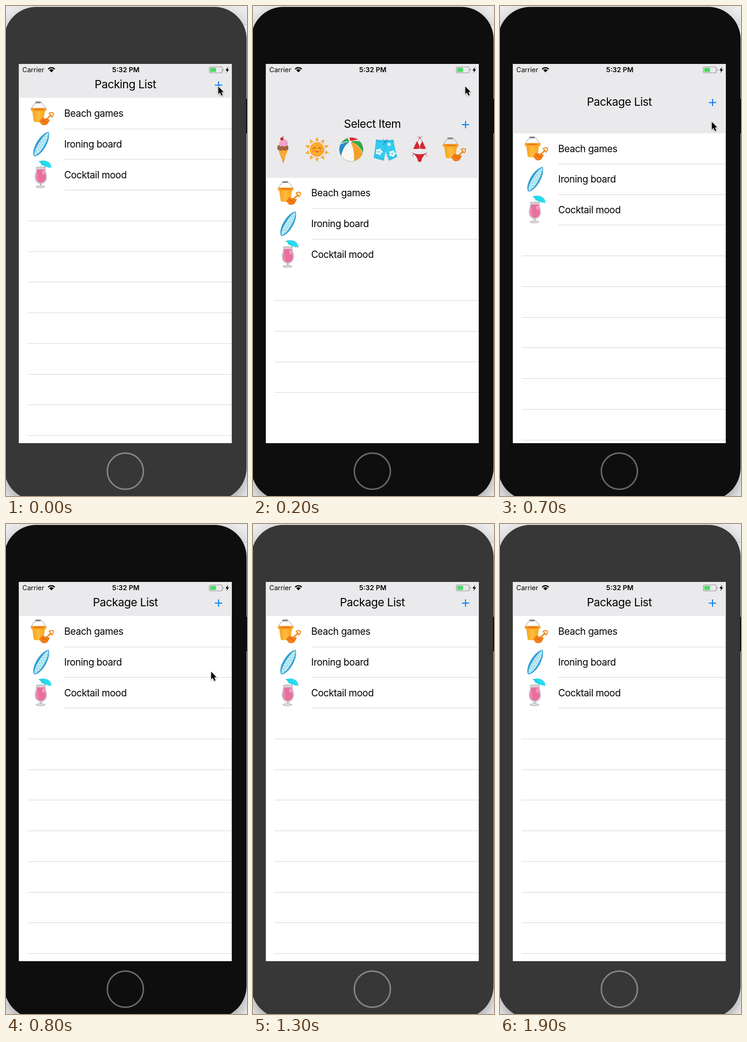
Animation, 525 px wide and 1066 px high, one loop 2 s. Source, as an HTML page with a canvas:

```html
<!DOCTYPE html>
<html lang="en">
<head>
<meta charset="utf-8">
<title>Packing list</title>
<style>
html, body { margin: 0; width: 100%; height: 100%; overflow: hidden; background: #fff; }
canvas { display: block; width: 525px; height: 1066px; }
</style>
</head>
<body>
<canvas id="stage" width="525" height="1066"></canvas>
<script>
const ctx = document.getElementById('stage').getContext('2d');
const LOOP = 2000, STEP = 100;
const SCREEN = { x: 27.7, y: 126, w: 464.2, h: 825.2 };
const CLOSED = 200.3, OPEN = 373.6, ROW = 66.75;
const OPEN_AT = 35, CLOSE_AT = 613.7, SLIDE = 160;
const FONT = 'Inter, "Liberation Sans", sans-serif';

const clamp = x => Math.max(0, Math.min(1, x));
const ease = x => { x = clamp(x); return x * x * (3 - 2 * x); };
const mix = (a, b, k) => a + (b - a) * k;

function rect(x, y, w, h, fill) {
  ctx.fillStyle = fill;
  ctx.fillRect(x, y, w, h);
}

function round(x, y, w, h, r, fill, stroke, width) {
  ctx.beginPath();
  ctx.roundRect(x, y, w, h, r);
  paint(fill, stroke, width);
}

function paint(fill, stroke, width = 1) {
  if (fill) { ctx.fillStyle = fill; ctx.fill(); }
  if (stroke) { ctx.strokeStyle = stroke; ctx.lineWidth = width; ctx.stroke(); }
}

function shape(d, fill, stroke, width = 1) {
  const p = new Path2D(d);
  if (fill) { ctx.fillStyle = fill; ctx.fill(p); }
  if (stroke) { ctx.strokeStyle = stroke; ctx.lineWidth = width; ctx.stroke(p); }
}

function oval(x, y, rx, ry, fill, stroke, width) {
  ctx.beginPath();
  ctx.ellipse(x, y, rx, ry, 0, 0, Math.PI * 2);
  paint(fill, stroke, width);
}

function text(str, x, y, size, align = 'left', weight = 400, spacing = 0) {
  ctx.font = `${weight} ${size}px ${FONT}`;
  ctx.letterSpacing = spacing + 'px';
  ctx.textAlign = align;
  ctx.fillStyle = '#000';
  ctx.fillText(str, x, y);
}

function place(icon, x, y) {
  ctx.save();
  ctx.translate(x, y);
  ctx.lineCap = ctx.lineJoin = 'round';
  icon();
  ctx.restore();
}

function bucket() {
  shape('M-24-9Q-20-17-13-24M10-9Q6-17-1-24', null, '#85858c', 1);
  round(-14, -26, 12, 4, 1.5, '#88888c');
  const pail = ctx.createLinearGradient(-22, 0, 8, 0);
  pail.addColorStop(0, '#f7a01c');
  pail.addColorStop(0.5, '#ffbc3a');
  pail.addColorStop(1, '#f8a21b');
  shape('M-21-8H7L4 15Q4 19-1 19H-13Q-18 19-18 15Z', pail);
  round(-23.5, -11.5, 33, 6, 2.5, '#ffab25', '#ee9416', 0.8);
  oval(-7, -9, 13.5, 1.7, '#e8741a');
  shape('M9 14L20 4', null, '#f08a18', 3);
  shape('M16 0Q20-3 25-1Q27 2 22 8Z', null, '#f08a18', 2.2);
  shape('M-5 17L1 10Q9 12 17 14L12 23Q6 27 0 24Z', '#f57f17', '#d9640c', 0.8);
  shape('M1 15L11 19', null, '#cf5d0d', 1.3);
}

function board() {
  ctx.translate(-1, 0);
  ctx.rotate(0.53);
  shape('M0-31C7-25 11-12 10.5 4C10 18 6 27 0 31C-6 27-10 18-10.5 4C-11-12-7-25 0-31Z', '#2c9dd6', '#84c3df', 0.8);
  shape('M0-29C5-24 7-12 7 3C7 17 4 25 0 29C-4 25-6 17-6 3C-6-12-4-24 0-29Z', '#bfeaf2');
  for (let i = 0; i < 15; i++) oval(i % 2 ? 2.5 : -2, -24 + i * 3.5, 1.6, 1.1, '#7accdf');
}

function cocktail() {
  shape('M1-3L9-23', null, '#a98b7c', 1.2);
  shape('M-6-29Q6-33 15-27Q21-22 20-15Q17-18 14-16Q11-20 7-18Q4-22 0-21Q-2-27-6-29Z', '#27def2', '#19b9d4', 0.7);
  shape('M-6-29Q7-26 14-16M-6-29Q3-27 7-18', null, '#16bcd6', 0.7);
  shape('M-12-16H8C6-9 11-3 10.5 6C10 15 4 19-2 20C-8 19-14 15-14.5 6C-15-3-10-9-12-16Z', '#e5dfe5', '#a9a3a9', 1);
  shape('M-10.5-12H6.5C6-7 9-2 9 6C8.5 14 3 17-2 18C-7 17-12.5 14-13 6C-13-2-10-7-10.5-12Z', '#e8709f');
  shape('M1-9L6-9L6-1L2 0Z', '#f5a5c2');
  shape('M-10-3Q-11 6-8 12', null, '#f3a0c0', 1.5);
  oval(-2, -16, 10, 1.6, '#d6d3d7', '#a8a6a8', 0.7);
  shape('M-3 20H-1V25H-3Z', '#cfcfcf', '#aaa', 0.8);
  oval(-3, 26, 10, 2.4, '#dedede', '#a6a6a6', 1);
}

function iceCream() {
  shape('M-10-2H11L1 29Z', '#f3a02a', '#cf8020', 0.7);
  shape('M-7 2L5 18M-1 0L8 11M7 2L-5 14M10 5L-2 23', null, '#ffcb5b', 1.1);
  shape('M-12-5C-12-14 13-14 12-5Q13 2 8 1Q4 5 0 1Q-5 5-8 1Q-13 2-12-5Z', '#a3643f');
  shape('M-8-9C-10-27 13-27 11-10Q9-6 6-8Q2-4-2-8Q-7-5-8-9Z', '#f3a2cb');
  for (let i = 0; i < 7; i++)
    rect(-5 + (i * 5) % 14, -19 + (i * 3) % 9, 1.8, 1, i % 2 ? '#8d7cc8' : '#fff3a5');
  oval(-2, -23, 3.6, 3.4, '#cf2a3a');
  shape('M-1-26Q0-29 2-29', null, '#6e2a20', 1);
}

function sun() {
  for (let i = 0; i < 10; i++) {
    ctx.save();
    ctx.rotate(i * Math.PI / 5);
    shape('M-3.6-18.5Q0-20 3.6-18.5L0-26.5Z', '#fbae2c', '#f09d22', 0.6);
    ctx.restore();
  }
  oval(0, 0, 15.5, 15.5, '#ffab2c', '#f59a1e', 1);
  shape('M-9-2Q-6-6-3-2M3-2Q6-6 9-2', null, '#8a4a13', 1.2);
  oval(-8, 3, 2.5, 2, '#fb8539');
  oval(8, 3, 2.5, 2, '#fb8539');
  shape('M-4 4Q0 9 4 4Z', '#d54727');
}

function ball() {
  ctx.save();
  ctx.beginPath();
  ctx.arc(0, 0, 26, 0, Math.PI * 2);
  ctx.clip();
  rect(-27, -27, 54, 54, '#f7f7f3');
  shape('M-2-17Q-17-10-22 14L-30 12V-6Q-16-17-2-17Z', '#258acb');
  shape('M-2-17Q8 0 6 28H26L24 8Q17-10-2-17Z', '#f5a02a');
  shape('M-2-17Q16-12 25 7L31 0L22-17Q9-20-2-17Z', '#39a54a');
  shape('M-2-17Q7-21 17-21L10-30H-5Z', '#e12b2e');
  shape('M-2-17Q-12-19-22-13L-18-24L-11-27Z', '#39a54a');
  oval(-2, -17, 3, 2, '#fff');
  ctx.restore();
  oval(0, 0, 26, 26, null, '#a8a295', 0.8);
}

function flower(x, y, r) {
  for (let i = 0; i < 5; i++) {
    const a = i * Math.PI * 0.4;
    oval(x + Math.cos(a) * r, y + Math.sin(a) * r, r * 0.65, r * 0.5, '#fff');
  }
  oval(x, y, 1.2, 1.2, '#f2de72');
}

function shorts() {
  shape('M-20-21Q0-18 17-21Q19-5 25 16L8 24L0 2L-4 24L-25 18Q-22 0-20-21Z', '#34cdf2', '#1fa9d3', 0.8);
  shape('M-20-18Q0-15 18-18M-1-17L0 2M-24 15L-4 21M7 21L24 13', null, '#1ba5d2', 0.9);
  shape('M-1-18L-6-23M-1-18Q4-26 4-18Q2-14-1-18L-5-10', null, '#1b76b0', 1);
  flower(-14, 5, 4.6);
  flower(15, 9, 4.6);
  flower(8, -11, 2.4);
}

function bikini() {
  shape('M-6-14L-1-24L0-28L2-24L7-14M-13-2H13M0-24L-5-28M0-24L5-28', null, '#b81d2a', 0.8);
  shape('M-6-17Q0-9-1-3Q-7 0-13-2ZM6-17Q0-9 1-3Q7 0 13-2Z', '#d8262f', '#ae1b28', 0.6);
  shape('M-13 9Q0 13 13 9Q5 16 3 26Q0 28-3 26Q-5 16-13 9Z', '#d8262f', '#ae1b28', 0.6);
  shape('M-13 9L-16 7M-13 9L-15 15M13 9L16 7M13 9L15 15', null, '#c51f2c', 1);
}

const rows = [['Beach games', bucket], ['Ironing board', board], ['Cocktail mood', cocktail]];
const strip = [iceCream, sun, ball, shorts, bikini, bucket, board];

function drawPhone(dim) {
  rect(0, 0, 525, 1066, '#fbfbfb');
  rect(0, 0, 525, 40, '#eeeef0');
  rect(0, 40, 525, 1, '#d2d2d4');
  ctx.save();
  ctx.shadowColor = 'rgba(0,0,0,.38)';
  ctx.shadowBlur = 38;
  ctx.shadowOffsetY = 16;
  round(-4, 2, 528, 1073, 70, dim ? '#373737' : '#0e0e0e');
  ctx.restore();
  rect(523, 202, 2, 75, '#060606');
  oval(260, 1012, 39.3, 39.3, null, dim ? '#858585' : '#686868', 3.2);
}

function drawStatus() {
  text('Carrier', 35.5, 144, 14.6);
  text('5:32 PM', 261, 144, 14.8, 'center', 600);
  const apex = 144.5;
  ctx.lineCap = 'butt';
  for (const r of [5.8, 10.2]) {
    ctx.beginPath();
    ctx.arc(99, apex, r, -Math.PI * 0.75, -Math.PI * 0.25);
    paint(null, '#000', 2.5);
  }
  shape(`M99 ${apex}l-3-3.3q3-2.4 6 0z`, '#000');
  round(443, 132.5, 28, 13, 3, null, '#8e8e92', 1.2);
  round(445, 134.5, 12.5, 9, 1, '#4cd964');
  shape('M473 136.5Q476 139 473 141.5Z', '#8e8e92');
  shape('M484 132.5L478 140H481.5L480 145.5L486 138H482.5Z', '#000');
}

function drawHeader(h, title, open, plusColor) {
  const mid = (SCREEN.y + h) / 2;
  rect(SCREEN.x, SCREEN.y, SCREEN.w, Math.round(h) - SCREEN.y, '#eaeaec');
  drawStatus();
  text(title, 260, Math.floor(mid + 16), 24.5, 'center', 400, -0.49);
  const y = Math.round(mid + 8.5);
  rect(455, y - 1, 16, 2.2, plusColor);
  rect(461.9, y - 8, 2.2, 16, plusColor);
  if (open) strip.forEach((icon, i) => place(icon, 65 + 74.5 * i, h - 61.5));
}

function drawTable(h, open) {
  rect(SCREEN.x, SCREEN.y, SCREEN.w, SCREEN.h, '#fff');
  for (let i = 1; i <= 11; i++) {
    // the scaled view drops some hairlines while expanded
    if (open && i % 5 === 3) continue;
    const x = i <= rows.length ? 127 : 47;
    rect(x, Math.floor(h + ROW * i), 492 - x, 1, '#d2d2d4');
  }
  rows.forEach(([label, icon], i) => {
    const y = h + ROW * (i + 0.5);
    place(icon, 78, y);
    text(label, 126.8, Math.round(y + 7.5), 20.8, 'left', 400, -0.42);
  });
}

function drawCursor(t) {
  if (t >= 1300) return;
  const toPlus = ease((t - 250) / 250);
  const down = ease((t - 720) / 400);
  const leave = clamp((t - 1000) / 200);
  let x = mix(462, 461, toPlus), y = mix(175, 252, toPlus);
  if (t > 700) {
    const k = Math.min(1, down / ease(0.7));
    x = mix(mix(461, 351, k), 330, leave);
    y = mix(mix(252, 774, k), 1008, leave);
  }
  ctx.save();
  ctx.translate(x, y);
  ctx.scale(0.95, 0.95);
  ctx.lineJoin = 'round';
  ctx.shadowColor = 'rgba(0,0,0,.3)';
  ctx.shadowBlur = 3;
  ctx.shadowOffsetY = 1;
  const arrow = 'M.5 0V17.5L4.4 14L7.5 21L10.6 19.7L7.6 13H12.8Z';
  shape(arrow, '#fff', '#fff', 2.2);
  ctx.shadowColor = 'transparent';
  shape(arrow, '#000');
  ctx.restore();
}

function draw(t) {
  const slide = ease((t - OPEN_AT) / SLIDE) - ease((t - CLOSE_AT) / SLIDE);
  const h = mix(CLOSED, OPEN, slide);
  const open = slide > 0.99;
  const title = t < OPEN_AT ? 'Packing List' : t < CLOSE_AT ? 'Select Item' : 'Package List';
  const opening = t > OPEN_AT && t < OPEN_AT + SLIDE;
  drawPhone(t < OPEN_AT || t >= 1300);
  ctx.save();
  ctx.beginPath();
  ctx.rect(SCREEN.x, SCREEN.y, SCREEN.w, SCREEN.h);
  ctx.clip();
  drawTable(h, open);
  drawHeader(h, title, open, opening ? '#1c9bd9' : '#087df5');
  ctx.restore();
  drawCursor(t);
}

const start = performance.now();
function tick() {
  const t = (performance.now() - start) % LOOP;
  draw(Math.floor(t / STEP) * STEP);
  requestAnimationFrame(tick);
}
tick();
</script>
</body>
</html>
```
